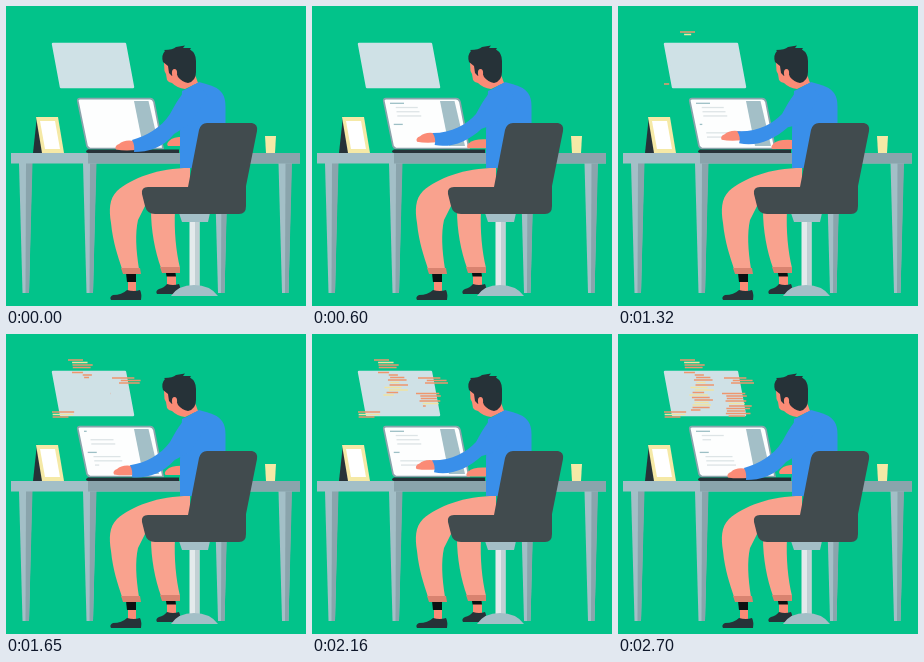
These frames come from a looping animation (300x300 px, 2730 ms). An HTML page:

```html
<!DOCTYPE html>
<html lang="en">
<head>
<meta charset="utf-8">
<title>Working at a desk</title>
<style>
  html, body { margin: 0; width: 100%; height: 100%; overflow: hidden; background: #02c38a; }
  svg { display: block; width: 100vw; height: 100vh; }
  .skin { fill: #f9a28e; }
  .flush { fill: #fb8b76; }
  .steel { fill: #a3bfc7; }
  .shade { fill: #8aa4ac; }
  .shirt { fill: #398fea; }
  .dark { fill: #263238; }
  .hem { fill: #d98370; }
  .cream { fill: #f5e9a6; }
</style>
</head>
<body>
<svg viewBox="0 0 300 300">
  <defs>
    <g id="leg">
      <path class="steel" d="M0 157H13L10 287H3.500Z"/>
      <path class="shade" d="M7 157H13.500L10 287H6.500Z"/>
    </g>
  </defs>

  <path d="M47 38H119L127 81H55Z" fill="#cfe1e6" stroke="#cfe1e6" stroke-width="2.400" stroke-linejoin="round"/>
  <g id="code"></g>

  <use href="#leg" x="13"/><use href="#leg" x="77"/>
  <use href="#leg" x="208.500"/><use href="#leg" x="272.500"/>
  <rect class="steel" x="5" y="147" width="289" height="10.500"/>
  <rect class="shade" x="82" y="147" width="212" height="10.500"/>

  <path class="dark" d="M31 110L37 147H27Z"/>
  <path class="cream" d="M30 111H52L58 147H36Z"/>
  <path fill="#fff" d="M34 115H49L54 143H39Z"/>
  <path class="cream" d="M259 130H270L269 147H260Z"/>

  <path d="M74 92.700H144Q147 92.700 148 96L157 142.500H84Q82 142 81 140L72 96Q71 92.700 74 92.700Z" fill="#fdfefe" stroke="#8aa4ac" stroke-width="1.700"/>
  <path class="steel" d="M128 95H142.500L153 140H137Z"/>
  <g id="text"></g>
  <path class="dark" d="M82 143.500H173V147H82Q80 147 80 145Z"/>

  <path class="skin" d="M145 204H169C168 225 170 245 174 262H155C149 245 145 225 145 204Z"/>
  <path class="flush" d="M161 269H170V280H161Z"/>
  <path fill="#0c1112" d="M160 267H169.500L170 270.500H160.500Z"/>
  <path class="hem" d="M154 261H174V267H156Z"/>
  <path class="dark" d="M161 278Q167 280 173 278Q175 282 174 288H151Q149 285 153 283Q158 282 161 278Z"/>

  <path class="skin" d="M184 162C152 162 126 172 111 185C103 193 103 204 105 217C107 237 112 250 116 263H133C130 243 129 228 132 214L139 200L184 190Z"/>
  <path class="flush" d="M122 274H130V286H122Z"/>
  <path fill="#0c1112" d="M120 267H130V276H121Z"/>
  <path class="hem" d="M115 262H134L135 268H117Z"/>
  <path class="dark" d="M121 284Q128 286 134 284Q136 288 135 294H105Q103 291 107 289Q116 289 121 284Z"/>

  <rect x="183.500" y="213" width="10" height="70" fill="#e4eaec"/>
  <rect x="189" y="213" width="4.500" height="70" fill="#c2d0d4"/>
  <path class="steel" d="M173 207H204L202 216H176ZM165 290Q172 279 188 279T212 290Z"/>

  <path id="backHand" class="flush" d="M174 134Q160 133 155 138Q152 141 154 143H174Z"/>
  <path class="flush" d="M158 57L158.500 65L160 68L161 74Q163 77 166 77Q171 82 179 83L192 77L186 60L168 50Z"/>
  <path class="shirt" d="M176 85Q184 82 193 76L200 78Q212 81 216 87Q219.500 92 219.500 100V120L190 162H174V125Z"/>
  <path class="dark" d="M157 56Q155 49 159 45L158 44Q167 44 170 41L179 39.500L177 42L185 42L184 43.500Q190 47 190 55V66Q190 75 182 77Q176 76 172 71L170 66L166 70L163 67L162 60Z"/>
  <ellipse cx="168.500" cy="67" rx="2.600" ry="4" class="flush"/>

  <path fill="#414b4e" d="M201 117H246Q252 118 251 125L240 180V200Q240 208 233 208H149Q141 208 139 200L136 188Q135 181 142 181H182L193 124Q195 117 201 117Z"/>
  <path id="hand" class="flush" d="M129 135Q118 133 113 138Q108 140 110 143.500Q118 145 130 144Z"/>
  <path id="sleeve" class="shirt"/>
</svg>

<script>
const LOOP = 2730, TYPING = 910, REWRITE = 800;
const byId = id => document.getElementById(id);
const clamp = v => Math.max(0, Math.min(1, v));

let seed = 11;
const random = () => (seed = seed * 16807 % 2147483647) / 2147483647;

function addBar(parent, x, y, height, fill) {
  const bar = document.createElementNS("http://www.w3.org/2000/svg", "rect");
  const attrs = { x, y: y - height / 2, height, fill, width: 0 };
  for (const name in attrs) bar.setAttribute(name, attrs[name]);
  return byId(parent).appendChild(bar);
}

// Two paragraphs on the laptop: a short heading, then indented rows
const lines = [];
for (let row = 0; row < 9; row++) {
  if (row == 4) continue;
  const heading = row % 5 == 0;
  lines.push({
    width: heading ? 14 - row : 21 + row,
    start: 30 + 115 * lines.length,
    bar: addBar("text", 78 + row * 0.75 + (heading ? 0 : 5), 97.3 + row * 4.22, 1.3,
      heading ? "#9dbfc5" : "#dde4e6")
  });
}

// Blocks of floating code, each written row by row
const blocks = [
  { x: 62, y: 26, rows: 4, indent: 7, start: 1210, pace: 70 },
  { x: 46, y: 78, rows: 3, indent: 1, start: 1300, pace: 100 },
  { x: 106, y: 44, rows: 3, indent: 12, start: 1450, pace: 60 },
  { x: 66, y: 38.5, rows: 16, indent: 13, start: 1480, pace: 70 },
  { x: 104, y: 59.5, rows: 10, indent: 7, start: 1650, pace: 100 }
];
const strips = blocks.flatMap(({ x, y, rows, indent, start, pace }) =>
  Array.from({ length: rows }, (_, row) => {
    const shift = row && indent * (0.4 + 0.6 * random());
    return {
      width: (rows > 10 ? 9 : 15) + 10 * random(),
      start: start + row * pace,
      bar: addBar("code", x + shift, y + row * 2.5, 1.5, random() < 0.65 ? "#ee966e" : "#f1e3a0")
    };
  }));

// Each row is wiped shortly before it is typed again
function lineWidth({ width, start }, t) {
  if (t < start) return 0;
  const age = (t - start) % REWRITE;
  return width * Math.min(clamp(age / 110), clamp((REWRITE - 95 - age) / 50));
}

function poseArms(t) {
  const lift = (1 - Math.cos(t / TYPING * 2 * Math.PI)) / 2;
  const mix = (down, up) => (down + (up - down) * lift).toFixed(2);
  byId("hand").setAttribute("transform", `translate(${mix(0, -6.5)} ${mix(0, -10)})`);
  byId("backHand").setAttribute("transform", `translate(${mix(8, 0)} ${mix(-3, 0)})`);
  byId("sleeve").setAttribute("d", `M192 77C178 82 173 92 164 108
    C${mix(155, 154)} ${mix(122, 118)} 140 ${mix(130, 126)} ${mix(126, 119)} ${mix(134, 125)}
    Q${mix(129, 123)} ${mix(139, 131)} ${mix(128, 121)} ${mix(146, 137)}
    C${mix(142, 138)} ${mix(146, 141)} ${mix(157, 155)} ${mix(142, 134)} ${mix(168, 170)} ${mix(128, 121)}
    L184 118L202 90Z`);
}

function draw(now) {
  const t = now % LOOP;
  for (const line of lines) line.bar.setAttribute("width", lineWidth(line, t));
  for (const strip of strips)
    strip.bar.setAttribute("width", strip.width * clamp((t - strip.start) / 90));
  poseArms(t);
  requestAnimationFrame(draw);
}
draw(performance.now());
</script>
</body>
</html>
```
